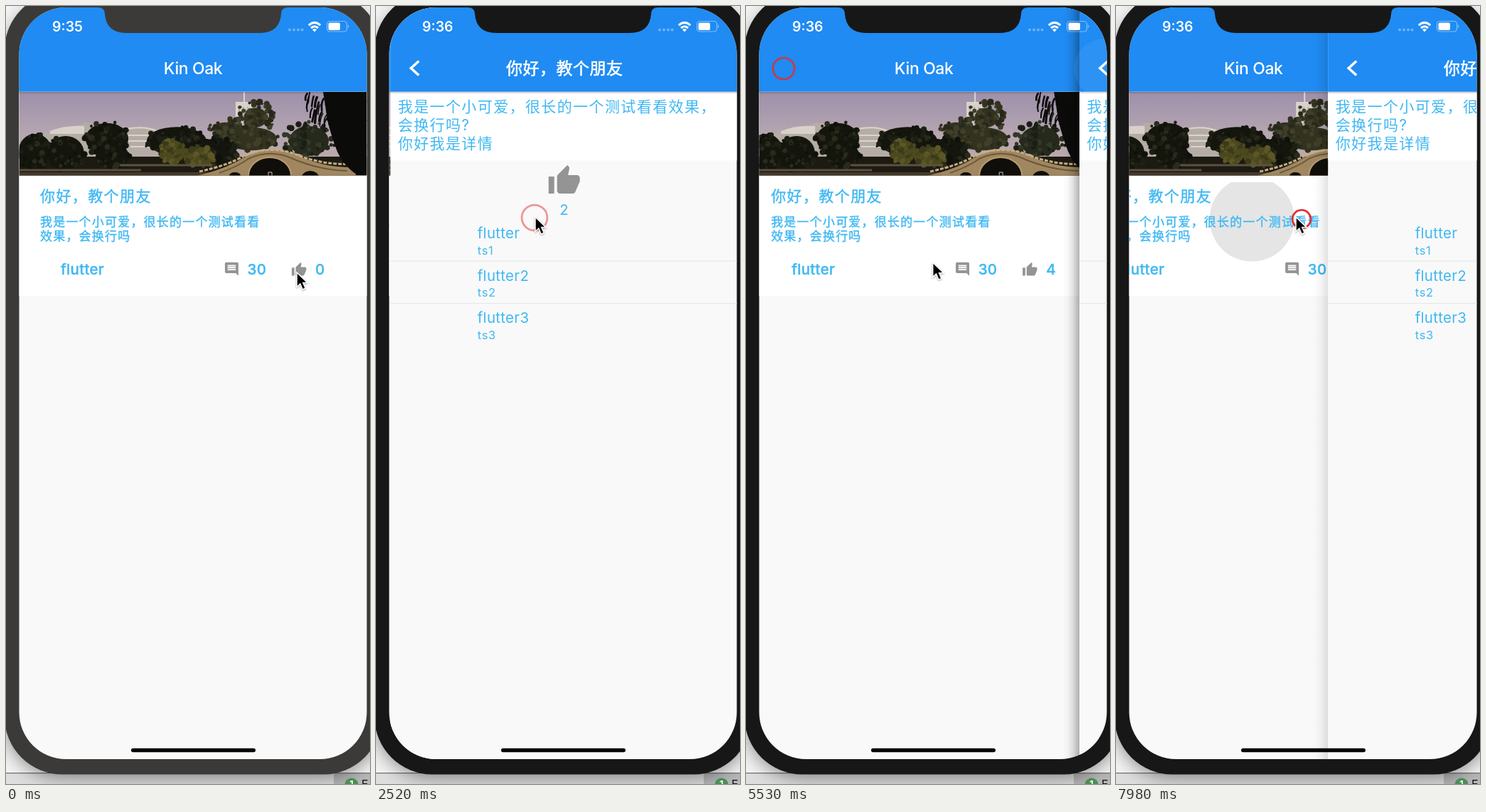
These frames come from a looping animation (512x1095 px, 8 s). An HTML page:

```html
<!DOCTYPE html>
<html lang="zh-CN">
<head>
<meta charset="utf-8">
<style>
html, body { margin: 0; width: 100%; height: 100%; overflow: hidden; background: #eee; }
svg { display: block; width: 512px; height: 1095px; }
text { font-family: Inter, 'Noto Sans CJK SC', 'Noto Sans CJK', sans-serif; }
.blue { fill: #40b8f3; }
.mid { font-weight: 500; stroke: #40b8f3; stroke-width: .4px; }
.head { font-size: 23px; font-weight: 500; fill: #fff; text-anchor: middle; }
.bold { stroke: #fff; stroke-width: .6px; }
.big { font-size: 21px; letter-spacing: 1.4px; }
.small { font-size: 17px; letter-spacing: 1.2px; }
.latin { font-size: 20.5px; letter-spacing: .3px; }
.sub { font-size: 16.5px; letter-spacing: .7px; }
.icon { fill: #949494; }
</style>
</head>
<body>
<svg id="stage" viewBox="0 0 512 1095"></svg>
<script>
const LOOP = 8000, W = 489, LEFT = 18.5;
const stage = document.getElementById('stage');

let seed = 11;
const rnd = () => (seed = (seed * 16807) % 2147483647) / 2147483647;

const rect = (x, y, w, h, fill, more = '') =>
  `<rect x="${x}" y="${y}" width="${w}" height="${h}" fill="${fill}" ${more}/>`;
const label = (x, y, cls, str, more = '') =>
  `<text x="${x}" y="${y}" class="${cls}" ${more}>${str}</text>`;

// Tree crown: a solid core with scattered leaf clumps around it
function tree(cx, cy, rx, ry, colors, n, core = .86) {
  let out = `<ellipse cx="${cx}" cy="${cy}" rx="${rx * core}" ry="${ry * core}" fill="${colors[0]}"/>`;
  for (let i = 0; i < n; i++) {
    const a = rnd() * Math.PI * 2, d = Math.sqrt(rnd()) * .95;
    const x = cx + Math.cos(a) * d * rx, y = cy + Math.sin(a) * d * ry;
    out += `<circle cx="${x.toFixed(1)}" cy="${y.toFixed(1)}" r="${(1.5 + rnd() * 3).toFixed(1)}" fill="${colors[i % colors.length]}"/>`;
  }
  return out;
}

// Hanging leaves in the right corner of the picture
function willow() {
  let out = '<path d="M446 121H508V238H494Q474 224 466 205Q452 170 449 140Z" fill="#0b0b09"/>';
  for (let i = 0; i < 85; i++) {
    const x = 410 + 98 * Math.sqrt(rnd()), y = 119 + rnd() * (x - 405) * .95;
    out += `<path d="M${x.toFixed(1)} ${y.toFixed(1)}q${(-1 - rnd() * 5).toFixed(1)} 6 ${(-2 - rnd() * 3).toFixed(1)} ${(9 + rnd() * 12).toFixed(1)}" stroke="#0b0b09" stroke-width="${(1.5 + rnd() * 2).toFixed(1)}" fill="none"/>`;
  }
  return out;
}

function photo() {
  const dark = ['#14160e', '#1d1f14', '#0f110b', '#2a2b1c'];
  const olive = ['#32321f', '#403f2a', '#262819'];
  const moss = ['#4b491d', '#5c5725', '#3b3b1b'];
  return `<g clip-path="url(#photoClip)">
    ${rect(18, 121, 490, 118, 'url(#sky)')}
    <path d="M48 183Q64 171 104 168L111 164 172 171Q196 167 215 176V218H60Z" fill="#b5ada5"/>
    <path d="M62 176Q84 167 110 169V180H62Z" fill="#d8d1c9"/>
    <path d="M170 173Q196 168 215 177M172 182H213M172 190H213M175 198H213" stroke="#dbd4cb" stroke-width="2" fill="none"/>
    ${rect(18, 212, 490, 27, '#1d1a12')}
    <path d="M335 121V136M324 136H350V190H324Z" stroke="#dcd5ce" stroke-width="2" fill="#d8d1c9"/>
    <path d="M328 142V185M334 142V185M340 142V185M346 142V185" stroke="#a9a19f" stroke-width="1.4"/>
    ${tree(308, 174, 25, 17, olive, 60, .6)}
    ${tree(351, 157, 30, 25, olive, 75, .55)}
    ${tree(345, 187, 42, 19, olive, 50)}
    ${tree(426, 190, 40, 30, ['#262a1c', '#343827', '#1b1e15'], 75, .7)}
    ${tree(41, 204, 27, 28, dark, 50)}
    ${tree(84, 207, 30, 28, dark, 50)}
    ${tree(142, 187, 35, 26, dark, 65)}
    ${tree(150, 211, 26, 22, dark, 30)}
    ${tree(240, 190, 49, 23, dark, 70)}
    ${tree(298, 206, 30, 24, dark, 40)}
    ${tree(234, 205, 21, 19, moss, 45)}
    ${tree(271, 212, 25, 16, moss, 45)}
    <path d="M160 224H290M18 231H190" stroke="#5c5141" stroke-width="3"/>
    ${rect(18, 234, 270, 5, '#443a2c')}
    <path d="M268 239Q310 229 333 214Q371 193 410 210Q447 228 492 227V239Z" fill="#a0875f"/>
    <path d="M272 233Q314 224 336 210Q371 196 406 208Q446 225 490 222" stroke="#c6ad82" stroke-width="3" stroke-dasharray="5 2" fill="none"/>
    <path d="M300 235Q326 226 341 215Q371 201 401 214Q440 231 480 232" stroke="#6c593d" stroke-width="2" fill="none"/>
    <ellipse cx="371" cy="239" rx="30" ry="26" fill="#100e0a" stroke="#b89d72" stroke-width="2"/>
    <ellipse cx="322" cy="239" rx="8" ry="5" fill="#100e0a"/>
    <ellipse cx="428" cy="241" rx="12" ry="9" fill="#100e0a"/>
    <path d="M369 239v-5h5v5" stroke="#c9c4ba" fill="none"/>
    ${willow()}
  </g>`;
}

const bar = `${rect(18, 120, 491, 4, 'url(#drop)')}${rect(18, 0, 491, 120.5, '#1f8bf3')}`;
const thumb = (x, y, s) => `<path class="icon" transform="translate(${x} ${y}) scale(${s})" d="M1 21h4V9H1v12zm22-11c0-1.1-.9-2-2-2h-6.31l.95-4.57.03-.32c0-.41-.17-.79-.44-1.06L14.17 1 7.59 7.59C7.22 7.95 7 8.45 7 9v10c0 1.1.9 2 2 2h9c.83 0 1.54-.5 1.84-1.22l3.02-7.05c.09-.23.14-.47.14-.73V10z"/>`;
const comment = '<path class="icon" transform="translate(306 358.8) scale(.95)" d="M21.99 4c0-1.1-.89-2-1.99-2H4c-1.1 0-2 .9-2 2v12c0 1.1.9 2 2 2h14l4 4-.01-18zM18 14H6v-2h12v2zm0-3H6V9h12v2zm0-3H6V6h12v2z"/>';
const splash = (id, fill = '#000') => `<g clip-path="url(#${id}Clip)"><circle id="${id}" fill="${fill}" opacity="0"/></g>`;
const clip = (id, shape) => `<clipPath id="${id}Clip">${shape}</clipPath>`;
const row = (y, name, sub) => label(141, y, 'blue latin', name) + label(141, y + 22.5, 'blue sub', sub);

stage.innerHTML = `
<defs>
  <linearGradient id="sky" x2="0" y2="1"><stop stop-color="#9d90aa"/><stop offset=".5" stop-color="#b5a6b1"/><stop offset="1" stop-color="#beadaa"/></linearGradient>
  <linearGradient id="drop" x2="0" y2="1"><stop stop-opacity=".26"/><stop offset="1" stop-opacity="0"/></linearGradient>
  <linearGradient id="edgeFill"><stop stop-opacity="0"/><stop offset=".3" stop-opacity=".03"/><stop offset=".6" stop-opacity=".13"/><stop offset="1" stop-opacity=".36"/></linearGradient>
  <filter id="soft" x="-20%" y="-20%" width="140%" height="140%"><feGaussianBlur stdDeviation="13"/></filter>
  ${clip('screen', '<rect x="18.5" y="2" width="489" height="1058" rx="66"/>')}
  ${clip('photo', '<rect x="18.5" y="121" width="489" height="117.5"/>')}
  ${clip('like', '<rect x="373.5" y="349" width="105" height="42.5" rx="2"/>')}
  ${clip('card', '<rect x="29" y="248" width="469" height="150"/>')}
  ${clip('thumb', '<rect x="211" y="222" width="104" height="47" rx="2"/>')}
  ${clip('back', '<circle cx="53" cy="88" r="42"/>')}
</defs>
${rect(0, 0, 512, 1095, '#f4f4f4')}
${rect(0, 1080, 512, 15, '#dededf')}
${rect(461, 1080, 51, 15, '#b8b8b9')}
${rect(0, 1079, 512, 1.2, '#6d6d6d')}
${rect(-2, -6, 530, 1092, '#000', 'rx="80" opacity=".42" filter="url(#soft)"')}
<circle cx="486" cy="1096" r="9.5" fill="#4a8f57"/>
${label(486, 1100, '', '1', 'font-size="13" font-weight="600" fill="#fff" text-anchor="middle"')}
${label(500, 1101, '', 'E', 'font-size="16" fill="#111"')}
<rect id="bezel" x="-2" y="-19" width="530" height="1100.5" rx="81"/>
<g clip-path="url(#screenClip)">
  <g id="home">
    ${rect(18, 0, 491, 1062, '#f9f9f9')}
    ${rect(18, 121, 491, 287, '#fff')}
    ${photo()}
    ${bar}
    ${label(263, 95.5, 'head', 'Kin Oak', 'letter-spacing="-.4"')}
    ${splash('card')}${splash('like')}
    ${label(48, 275, 'blue mid big', '你好，教个朋友')}
    ${label(48, 309.5, 'blue mid small', '我是一个小可爱，很长的一个测试看看')}
    ${label(48, 329.5, 'blue mid small', '效果，会换行吗')}
    ${label(77, 378, 'blue mid latin', 'flutter')}
    ${comment}
    ${label(339.5, 378, 'blue mid latin', '30')}
    ${thumb(401, 360, .93)}
    ${label(435, 378, 'blue mid latin', '', 'id="homeCount"')}
  </g>
  <g id="detail">
    ${rect(-5.5, 0, 24, 1062, 'url(#edgeFill)', 'id="edge"')}
    ${rect(LEFT, 0, 491, 1062, '#f9f9f9')}
    ${rect(LEFT, 121, 491, 96.5, '#fff')}
    <g transform="translate(.5 0)">${bar}</g>
    ${splash('back', '#fff')}
    <path d="M58.5 77.5L47.5 87.5 58.5 97.5" fill="none" stroke="#fff" stroke-width="3.6"/>
    ${label(263.5, 95.5, 'head bold', '你好，教个朋友', 'letter-spacing=".5"')}
    ${label(29, 149, 'blue big', '我是一个小可爱，很长的一个测试看看效果，')}
    ${label(29, 175, 'blue big', '会换行吗?')}
    ${label(29, 201, 'blue big', '你好我是详情')}
    ${splash('thumb')}
    ${thumb(239, 222, 2)}
    ${label(263, 294, 'blue latin', '', 'id="detailCount" text-anchor="middle"')}
    ${row(327, 'flutter', 'ts1')}${row(386.5, 'flutter2', 'ts2')}${row(446, 'flutter3', 'ts3')}
    ${rect(LEFT, 358.5, 489, 1, '#e6e6e6')}${rect(LEFT, 418, 489, 1, '#e6e6e6')}
  </g>
  ${rect(176, 1044.7, 175, 5.6, '#050505', 'rx="2.8"')}
</g>
<path id="notch" d="M129 0V2Q139 2 139 11Q141 38 169 38H357Q385 38 387 11Q387 2 397 2V0Z"/>
${label(65, 36, '', '', 'id="clock" font-size="19.5" font-weight="600" fill="#fff"')}
<g fill="#fff" opacity=".35">${[399, 405, 411, 416.5].map(x => `<circle cx="${x}" cy="33.5" r="2"/>`).join('')}</g>
<g fill="none" stroke="#fff" stroke-width="3">
  <path d="M425.8 27.2Q434 19.6 442.2 27.2M429 31Q434 26.6 439 31"/>
</g>
<path d="M431 33.2Q434 30.8 437 33.2L434 36.4Z" fill="#fff"/>
${rect(451.5, 21.5, 28, 14.5, 'none', 'rx="4" stroke="#fff" stroke-opacity=".45" stroke-width="1.2"')}
${rect(453.5, 23.5, 16.5, 10.5, '#fff', 'rx="2"')}
<path d="M481 26Q483.5 28.7 481 31.5Z" fill="#fff" opacity=".5"/>
<circle id="ring" fill="none" stroke="#e0302f" stroke-width="2.8"/>
<path id="cursor" d="M0 0V20.5L4.8 16 8.2 24 12.2 22.3 8.8 14.6H15.2Z" fill="#000" stroke="#fff" stroke-width="1.5" style="filter:drop-shadow(0 1px 1px rgba(0,0,0,.35))"/>`;

const el = {};
stage.querySelectorAll('[id]').forEach(n => el[n.id] = n);
const set = (n, attrs) => { for (const k in attrs) n.setAttribute(k, attrs[k]); };
const clamp = v => Math.max(0, Math.min(1, v));

// press time, release time, x, y, splash
const clicks = [
  [400, 490, 415, 363, 'like'], [1310, 1450, 415, 363, 'like'],
  [2070, 2150, 223, 298, 'card'],
  [3650, 3730, 258, 253, 'thumb'], [4120, 4200, 258, 253, 'thumb'],
  [5250, 5330, 53, 88, 'back'],
  [6620, 6700, 414, 372, 'like'], [7000, 7080, 414, 372, 'like'],
  [7832, 7915, 261, 300, 'card']
];
const path = [
  [0, 409, 375], [70, 409, 375], [350, 415, 361], [1600, 415, 361], [2000, 224, 297],
  [2590, 224, 297], [3340, 258, 253], [4550, 258, 253], [5180, 53, 87], [5370, 53, 87],
  [5530, 262, 361], [5720, 400, 376], [6250, 414, 378], [6500, 414, 372], [7250, 414, 372],
  [7700, 261, 298], [7910, 261, 298], [7980, 253, 297], [8000, 253, 297]
];

// Cubic timing curve (.35, .91) (.33, .97)
function ease(p) {
  if (p <= 0 || p >= 1) return clamp(p);
  const curve = (a, b, s) => 3 * (1 - s) * (1 - s) * s * a + 3 * (1 - s) * s * s * b + s * s * s;
  let lo = 0, hi = 1;
  for (let i = 0; i < 24; i++) {
    const s = (lo + hi) / 2;
    if (curve(.35, .33, s) < p) lo = s; else hi = s;
  }
  return curve(.91, .97, lo);
}

function cursorAt(t) {
  const i = Math.max(1, path.findIndex(k => k[0] >= t));
  const [t0, x0, y0] = path[i - 1], [t1, x1, y1] = path[i];
  const p = clamp((t - t0) / (t1 - t0));
  const e = t1 - t0 > 200 ? p * p * (3 - 2 * p) : p;
  return [x0 + (x1 - x0) * e, y0 + (y1 - y0) * e];
}

function draw(t) {
  const shown = ease((t - 2150) / 400) - ease((t - 5330) / 400) + ease((t - 7915) / 400);
  const off = W * (1 - shown);
  set(el.home, { transform: `translate(${-W * shown / 3} 0)` });
  set(el.detail, { transform: `translate(${off} 0)`, visibility: shown > 0 ? 'visible' : 'hidden' });
  set(el.edge, { opacity: (1 - shown) ** 2 });

  const body = t < 420 ? '#3b3a38' : '#171717';
  set(el.bezel, { fill: body });
  set(el.notch, { fill: body });
  el.clock.textContent = t < 700 ? '9:35' : '9:36';

  for (const id of ['like', 'card', 'thumb', 'back']) set(el[id], { opacity: 0 });
  set(el.ring, { opacity: 0 });
  let count = 0;
  for (const [down, up, x, y, id] of clicks) {
    const dt = t - up;
    if (dt >= 0 && (id === 'like' || id === 'thumb')) count++;
    if (t < down || dt > 520) continue;
    const age = Math.max(0, dt);
    set(el.ring, { cx: x, cy: y, r: 11.8 + age * .0165, opacity: 1 - (age / 520) ** 2 });
    set(el[id], {
      cx: x, cy: y, r: .4 * (t - down),
      opacity: (id === 'back' ? .3 : .115) * clamp(1 - (dt - 40) / 200)
    });
  }
  el.homeCount.textContent = el.detailCount.textContent = count;

  const [cx, cy] = cursorAt(t);
  set(el.cursor, { transform: `translate(${cx} ${cy})` });
}

const start = performance.now();
function tick() {
  draw((performance.now() - start) % LOOP);
  requestAnimationFrame(tick);
}
tick();
</script>
</body>
</html>
```
